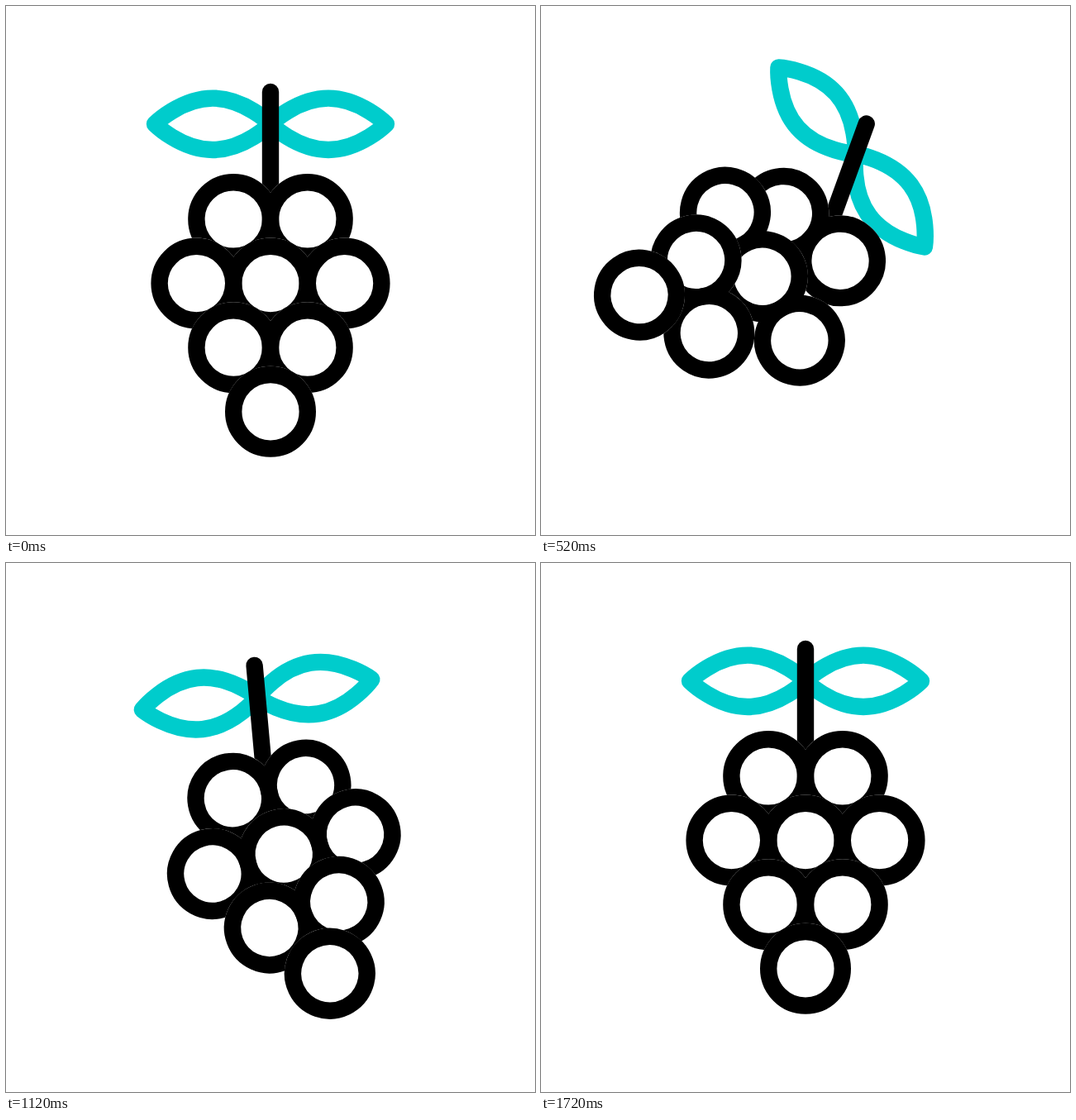
Write an HTML page that moves like this. It is 640 by 640 pixels and loops after 2000 ms.

```html
<!DOCTYPE html>
<html lang="en">
<head>
<meta charset="utf-8">
<title>Swinging grapes</title>
<style>
  html, body { margin: 0; width: 100%; height: 100%; overflow: hidden; background: #fff; }
  svg { display: block; width: 100vw; height: 100vh; }
</style>
</head>
<body>
<svg id="stage" viewBox="0 0 640 640"></svg>
<script>
const LOOP = 2000, STEP = 40;
const CENTER = 320, RADIUS = 44.8, LINE = 20.4;
const ROW_TOP = 258, ROW_GAP = RADIUS * Math.sqrt(3);
const LEAF_Y = 142.8, LEAF_HALF = 70, LEAF_RISE = 31.2, LEAF_COLOR = '#00cccc';

// Each part swings down, up and down again, then comes to rest.
const drop = sway([322, 47], [885, -28.3], [1222, 32.3], 1514);
const swing = sway([446, 21.8], [976, -12.8], [1303, 5.8], 1700);
const leftTurn = sway([420, 37.4], [840, -25.8], [1352, 17.7], 1700);
const rightTurn = sway([540, 33.6], [955, -18.8], [1363, 23], 1700);

// Eases from rest through [ms, value] peaks and back to rest.
function sway(...peaks) {
  const rest = peaks.pop();
  const keys = [[0, 0], ...peaks, [rest, 0]];
  return t => {
    const next = keys.findIndex(key => key[0] > t);
    if (next < 0) return 0;
    const [t0, v0] = keys[next - 1], [t1, v1] = keys[next];
    const u = (t - t0) / (t1 - t0);
    return v0 + (v1 - v0) * u * u * (3 - 2 * u);
  };
}

function add(parent, tag, attrs = {}) {
  const el = document.createElementNS('http://www.w3.org/2000/svg', tag);
  for (const name in attrs) el.setAttribute(name, attrs[name]);
  return parent.appendChild(el);
}

function addLeaf(parent, side) {
  const point = (d, rise = 0) => `${CENTER + side * d} ${LEAF_Y + rise} `;
  const tip = 2 * LEAF_HALF;
  const edge = (from, to, rise) => `C${point(from)}${point(from + (to - from) * 0.224, rise)}`
    + `${point(LEAF_HALF, rise)}S${point(to)}${point(to)}`;
  return add(parent, 'path', {
    d: `M${point(0)}${edge(0, tip, -LEAF_RISE)}${edge(tip, 0, LEAF_RISE)}Z`,
    fill: 'none', stroke: LEAF_COLOR, 'stroke-width': LINE, 'stroke-linejoin': 'round'
  });
}

const bunch = add(document.getElementById('stage'), 'g');
const leftLeaf = addLeaf(bunch, -1);
const rightLeaf = addLeaf(bunch, 1);
add(bunch, 'path', {
  d: `M${CENTER} 104V225`, stroke: '#000', 'stroke-width': LINE, 'stroke-linecap': 'round'
});

// Each row hangs from the one above; white discs hide what lies behind it.
let parent = bunch;
const rows = [2, 3, 2, 1].map((count, k) => {
  const cy = ROW_TOP + k * ROW_GAP;
  const el = parent = add(parent, 'g');
  const centers = Array.from({ length: count }, (_, i) => CENTER + (2 * i - count + 1) * RADIUS);
  centers.forEach(cx => add(el, 'circle', { cx, cy, r: RADIUS + LINE / 2, fill: '#fff' }));
  centers.forEach(cx => add(el, 'circle', {
    cx, cy, r: RADIUS, fill: 'none', stroke: '#000', 'stroke-width': LINE
  }));
  return { el, pivot: cy - RADIUS };
});

function turn(el, angle, pivotY, dy = 0) {
  el.setAttribute('transform', `translate(0 ${dy}) rotate(${angle} ${CENTER} ${pivotY})`);
}

function draw(t) {
  const angle = swing(t);
  turn(bunch, angle, CENTER, drop(t));
  turn(leftLeaf, leftTurn(t), LEAF_Y);
  turn(rightLeaf, rightTurn(t), LEAF_Y);
  rows.forEach(row => turn(row.el, angle, row.pivot));
}

const begin = performance.now();
function tick() {
  const t = (performance.now() - begin) % LOOP;
  draw(Math.floor(t / STEP) * STEP);
  requestAnimationFrame(tick);
}
tick();
</script>
</body>
</html>
```
